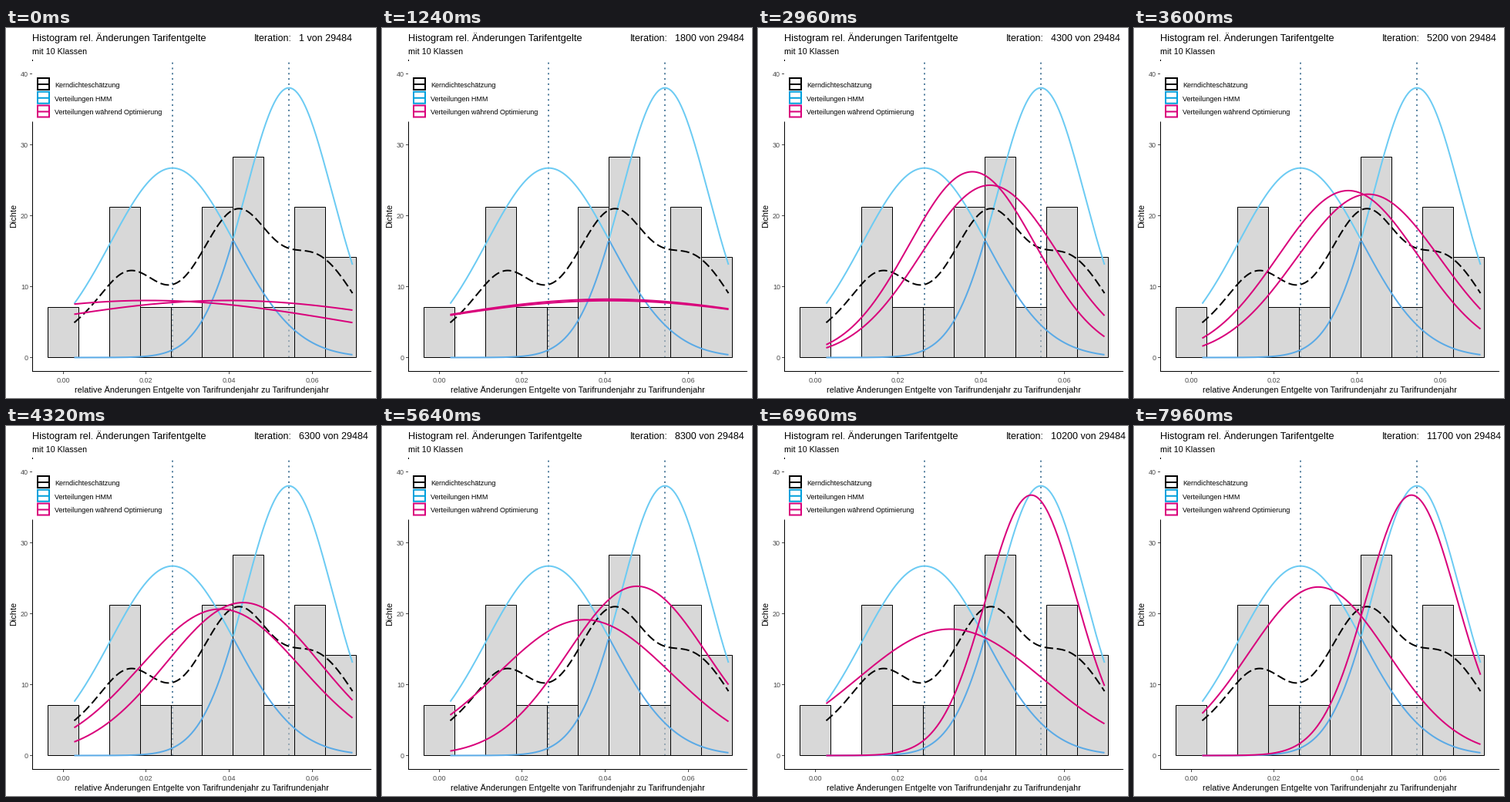
A matplotlib script that plays this animation: 480 px wide and 480 px high, repeating every 8000 ms.

```python
import math

import matplotlib.pyplot as plt
import numpy as np
from matplotlib.animation import FuncAnimation
from matplotlib.patches import Rectangle

plt.rcParams["font.family"] = "Liberation Sans"
plt.rcParams["path.snap"] = False

# The axes use pixel coordinates, y pointing down; 72 dpi makes 1 pt = 1 px.
SIZE, DPI = 480, 72
TICK_MS, TICKS = 40, 200
TICKS_PER_STEP = 1.69
X0, X_SCALE = 74.0, 5385.0
Y0, Y_SCALE = 427.5, 9.2
LEFT, RIGHT, TOP, BOTTOM = 34.5, 474, 41, 445.5
AREA = X_SCALE * Y_SCALE / math.sqrt(2 * math.pi)

CYAN, CYAN_LIGHT, CYAN_DARK = "#00a0dc", "#6ccbf3", "#5aaae6"
MAGENTA, DOTS, GREY = "#d9007b", "#54809f", "#4d4d4d"

BIN_LEFT, BIN_WIDTH, COUNT_HEIGHT = 54.5, 40, 65
COUNTS = [1, 0, 3, 1, 1, 3, 4, 1, 3, 2]
BANDWIDTH = 35.5
xs = np.linspace(88.5, 449.5, 300)

# Optimiser path as step: value, in pixels
LOW_MEAN = {0: 185, 18: 295, 43: 278, 63: 278, 117: 239}
LOW_SD = {0: 267, 18: 268, 43: 82, 63: 104, 102: 120.5, 117: 90.4}
HIGH_MEAN = {0: 287, 63: 307.5, 102: 354.5, 117: 360}
HIGH_SD = {0: 267, 18: 261, 43: 88.4, 63: 99.6, 83: 90, 102: 58.5}


def bell(mean, sd):
    """Height in pixels of a normal density."""
    return AREA / sd * np.exp(-0.5 * ((xs - mean) / sd) ** 2)


def along(path, step):
    """Geometric interpolation between the key values."""
    return np.exp(np.interp(step, list(path), np.log(list(path.values()))))


fig = plt.figure(figsize=(SIZE / DPI, SIZE / DPI), dpi=DPI, facecolor="white")
ax = fig.add_axes([0, 0, 1, 1])
ax.set_xlim(0, SIZE)
ax.set_ylim(SIZE, 0)
ax.axis("off")


def line(x, y, color="black", width=1.0, z=3, **kw):
    return ax.plot(x, y, color=color, lw=width, zorder=z,
                   solid_capstyle="butt", dash_capstyle="butt", **kw)[0]


def box(x, y, w, h, z, **kw):
    ax.add_patch(Rectangle((x, y), w, h, zorder=z, joinstyle="miter", **kw))


def label(x, y, text, size, color="black", **kw):
    return ax.text(x, y, text, fontsize=size, color=color, zorder=9, **kw)


def draw_axes():
    line([LEFT, LEFT], [TOP, BOTTOM + 0.5], z=1)
    line([LEFT - 0.5, RIGHT], [BOTTOM, BOTTOM], z=1)
    for v in range(0, 41, 10):
        y = Y0 - v * Y_SCALE
        line([31, 34], [y, y], GREY, z=7)
        label(29, y + 3.5, str(v), 9, GREY, ha="right")
    for v in (0, 0.02, 0.04, 0.06):
        x = math.floor(X0 + v * X_SCALE) + 0.5
        line([x, x], [446, 449], GREY)
        label(x, 459.5, f"{v:.2f}", 9, GREY, ha="center")
    label(253.5, 473, "relative Änderungen Entgelte von Tarifrundenjahr "
          "zu Tarifrundenjahr", 10.88, ha="center")
    label(15.5, 243, "Dichte", 10.9, rotation=90, ha="right", va="center")


def draw_bars():
    for i, count in enumerate(COUNTS):
        bar = BIN_LEFT + BIN_WIDTH * i, Y0, BIN_WIDTH, -COUNT_HEIGHT * count
        box(*bar, 2, fc="#bfbfbf", ec="none", alpha=0.6)
        box(*bar, 2.1, fc="none", ec="black", lw=1)


def draw_curves():
    low, high = bell(216, 80.4), bell(367, 56.5)
    for x in (216, 367):
        line([x, x], [Y0, TOP], DOTS, 2, z=1.5, linestyle=(0, (1, 2.4)))
    for own, other in ((low, high), (high, low)):
        line(xs, Y0 - np.where(own >= other, np.nan, own), CYAN_DARK, 2)
        line(xs, Y0 - np.where(own >= other, own, np.nan), CYAN_LIGHT, 2)

    # Kernel density of the binned sample, its extremes at the curve's ends
    centres = BIN_LEFT + BIN_WIDTH * (np.arange(len(COUNTS)) + 0.5)
    sample = np.repeat(centres, COUNTS)
    sample[[0, -1]] = xs[[0, -1]]
    density = np.mean([bell(x, BANDWIDTH) for x in sample], axis=0)
    line(xs, Y0 - density, width=2, z=4, linestyle=(0, (5.6, 2.4)))


def draw_legend():
    box(34, TOP + 2, 176, 78.5, 6, fc="white", ec="none")
    rows = [("Kerndichteschätzung", "black"), ("Verteilungen HMM", CYAN),
            ("Verteilungen während Optimierung", MAGENTA)]
    for i, (text, color) in enumerate(rows):
        y = 65 + 17.75 * i
        box(41, y, 15, 15, 7, fc="white", ec=color, lw=2)
        line([42, 56], [y + 8, y + 8], color, 2, z=8)
        label(63, y + 12, text, 9.05)


draw_axes()
draw_bars()
draw_curves()
draw_legend()
label(34, 17, "Histogram rel. Änderungen Tarifentgelte", 12.75)
label(34, 34, "mit 10 Klassen", 10.7)
label(321.5, 17, "Iteration:", 12.5)
counter = label(380, 17, "", 12.5)
low_fit, high_fit = (line(xs, xs, MAGENTA, 2, z=5) for _ in range(2))


def update(tick):
    step = max(0, math.ceil((tick - 0.55) / TICKS_PER_STEP) - 1)
    counter.set_text(f"{max(1, 100 * step)} von 29484")
    low_fit.set_ydata(Y0 - bell(along(LOW_MEAN, step), along(LOW_SD, step)))
    high_fit.set_ydata(Y0 - bell(along(HIGH_MEAN, step), along(HIGH_SD, step)))
    return counter, low_fit, high_fit


anim = FuncAnimation(fig, update, frames=TICKS, interval=TICK_MS,
                     repeat=True, repeat_delay=0)
plt.show()
```
